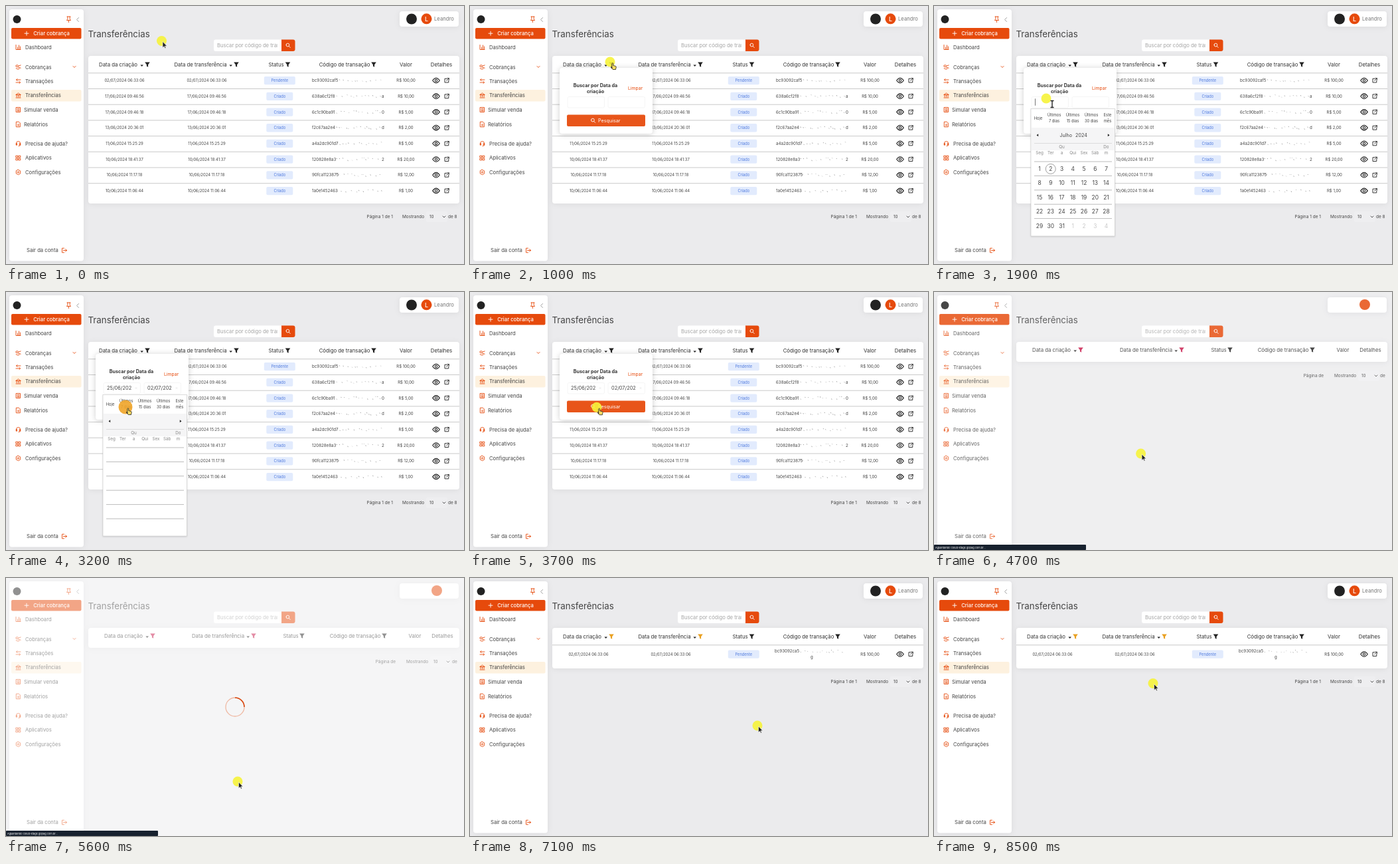
An HTML page that plays this animation: 690 by 388 pixels, repeating every 8700 ms.

```html
<!DOCTYPE html>
<html lang="pt-BR">
<head>
<meta charset="utf-8">
<title>Transferências</title>
<style>
  html, body { margin: 0; width: 100%; height: 100%; overflow: hidden; background: #ebebed; }
  svg { display: block; width: 100%; height: 100%; font-family: Inter, "Open Sans", sans-serif; }
  .card { filter: drop-shadow(0 1px 4px #0001); }
  .popup { filter: drop-shadow(0 1px 4px #0003); }
  .sheet { filter: drop-shadow(0 1px 1px #0002); }
</style>
</head>
<body>
<svg id="stage" viewBox="0 0 690 388"></svg>
<script>
const LOOP = 8700, STEP = 100;
const ORANGE = '#e64a0c', INK = '#444';

// Markup helpers: text is centred vertically on y.
const text = (x, y, s, { size = 7.7, fill = INK, weight = 400, anchor = 'start' } = {}) =>
  `<text x="${x}" y="${y + size * 0.36}" font-size="${size}" fill="${fill}" font-weight="${weight}" text-anchor="${anchor}">${s}</text>`;
const mid = (x, y, s, style) => text(x, y, s, { ...style, anchor: 'middle' });
const rect = (x, y, w, h, fill, r = 0, more = '') =>
  `<rect x="${x}" y="${y}" width="${w}" height="${h}" rx="${r}" fill="${fill}" ${more}/>`;
const circle = (x, y, r, fill, more = '') => `<circle cx="${x}" cy="${y}" r="${r}" fill="${fill}" ${more}/>`;
const line = (x1, x2, y, color, width = 0.8) => `<path d="M${x1} ${y}H${x2}" stroke="${color}" stroke-width="${width}"/>`;
const icon = (x, y, d, color = ORANGE, width = 0.9) =>
  `<path transform="translate(${x} ${y})" d="${d}" fill="none" stroke="${color}" stroke-width="${width}" stroke-linecap="round" stroke-linejoin="round"/>`;
const solid = (x, y, d, fill = '#222') => `<path transform="translate(${x} ${y})" d="${d}" fill="${fill}"/>`;
const group = (id, content) => `<g id="${id}">${content}</g>`;

const ICONS = {
  chart: 'M-3.5-3.5V3.5H3.5M-1 3V0M1 3V-3M3 3V-1',
  coins: 'M-3.5-1.8a1.6 1.6 0 1 0 3.2 0a1.6 1.6 0 1 0-3.2 0M.3-1.8L3.6-3M-.5 0L3.6 1.2M-3.4 1.8Q0 4.5 1.8 2.2',
  swap: 'M3.5-2H-3M-1.5-3.5L-3-2L-1.5-.5M-3.5 2H3M1.5 .5L3 2L1.5 3.5',
  bank: 'M-3.5-1.2L0-3.5L3.5-1.2ZM-2.5-1V2.2M0-1V2.2M2.5-1V2.2M-3.5 3.5H3.5',
  calculator: 'M-3-3.5H3V3.5H-3ZM-1.5-1.5H1.5M-1.5 .5H1.5M-1.5 2H1.5',
  report: 'M-2.8-3.8H1L2.8-2V3.8H-2.8ZM-1 0H1M-1 1.8H1',
  headset: 'M-3 1V-.5a3 3 0 0 1 6 0V1M-3.3 0V2.2H-2V0ZM3.3 0V2.2H2V0ZM3 2.2Q3 3.6 .5 3.6',
  apps: 'M-3.3-3.3H-.7V-.7H-3.3ZM.7-3.3H3.3V-.7H.7ZM-3.3 .7H-.7V3.3H-3.3ZM.7 .7H3.3V3.3H.7Z',
  gear: 'M0-3.7L3.2-1.9V1.9L0 3.7L-3.2 1.9V-1.9ZM-1.2 0a1.2 1.2 0 1 0 2.4 0a1.2 1.2 0 1 0-2.4 0',
  exit: 'M0-3.3H-3V3.3H0M-1 0H4M2.3-1.8L4 0L2.3 1.8',
  pin: 'M-2.5-4H2.5M-1.7-4V-.5L-3 1.5H3L1.7-.5V-4M0 1.5V4.5',
  left: 'M1.5-3L-1.5 0L1.5 3',
  down: 'M-2-1L0 1L2-1',
  lens: 'M-3-.7a2.4 2.4 0 1 0 4.8 0a2.4 2.4 0 1 0-4.8 0M1.1 1.1L3.2 3.2',
  eye: 'M-5.3 0Q0-7.6 5.3 0Q0 7.6-5.3 0ZM-1.7 0a1.7 1.7 0 1 0 3.4 0a1.7 1.7 0 1 0-3.4 0',
  open: 'M0-2.8H-3V3H2.8V0M.8-3.3H3.3V-.8M3.3-3.3L-.3 .3',
};
const FUNNEL = 'M-3.8-3.5H3.8L1.1 .3V3.8L-1.1 2.4V.3Z';
const CARET = 'M-2.3-1H2.3L0 1.5Z';

const MENU = [
  [62, 29, 'chart', 'Dashboard'], [92, 29, 'coins', 'Cobranças'], [113, 29, 'swap', 'Transações'],
  [134.5, 29, 'bank', 'Transferências'], [156, 27, 'calculator', 'Simular venda'], [178, 27, 'report', 'Relatórios'],
  [207, 29, 'headset', 'Precisa de ajuda?'], [228.5, 29, 'apps', 'Aplicativos'], [250, 29, 'gear', 'Configurações'],
];

const sidebar = () => rect(5, 5, 112, 378.5, '#fff', 4, 'class="card"')
  + circle(16.5, 20, 6, '#222')
  + icon(94.5, 20, ICONS.pin) + icon(108, 20.5, ICONS.left, '#999')
  + rect(8, 33, 105.5, 16.5, ORANGE, 2)
  + icon(31, 41.2, 'M-3 0H3M0-3V3', '#fff') + mid(68.5, 41.2, 'Criar cobrança', { fill: '#fff', weight: 500 })
  + rect(8, 126, 105.5, 17.5, '#fdf1df', 2)
  + MENU.map(([y, x, name, label]) => icon(18.5, y, ICONS[name]) + text(x, y, label)).join('')
  + icon(103, 91.5, ICONS.down)
  + text(31, 367.5, 'Sair da conta') + icon(87.5, 367.5, ICONS.exit);

const toolbar = () => text(123.5, 42.5, 'Transferências', { size: 13.3 })
  + rect(313, 50.5, 103, 17.5, '#fff', 3)
  + `<g clip-path="url(#searchClip)">${text(318, 59.2, 'Buscar por código de transação', { fill: '#a5a5a5' })}</g>`
  + `<path d="M415 50.5h17.5q3 0 3 3v11.5q0 3-3 3H415z" fill="${ORANGE}"/>` + icon(425, 59.3, ICONS.lens, '#fff')
  + rect(593, 8, 89, 23, '#fff', 4, 'class="card"');

const profile = () => circle(611, 19.5, 8, '#222') + circle(633.5, 19.3, 8, ORANGE)
  + mid(633.5, 19.5, 'L', { size: 9, fill: '#fff', weight: 500 }) + text(645, 19.5, 'Leandro', { fill: '#777' });

// Each column: label centre, then funnel centre when it can be filtered.
const WIDE = [[169, 213], [293, 347], [407, 424.5], [510, 554], [602.5], [656]];
const EMPTY = [[177, 221], [319.5, 373], [429, 446], [526, 570], [616], [657.5]];
const LABELS = ['Data da criação', 'Data de transferência', 'Status', 'Código de transação', 'Valor', 'Detalhes'];

const table = (columns, y, bottom) => rect(124, 75, 559, bottom - 75, '#fff', 4, 'class="card"')
  + columns.map(([x, funnel], i) => mid(x, y, LABELS[i], { size: 7.8, fill: '#333' })
    + (funnel ? solid(funnel, y, FUNNEL, i < 2 ? 'var(--filter)' : '#222') : '')
    + (i < 2 ? solid(funnel - 8.3, y + 1.6, CARET) : '')).join('');

const pager = (y, page, dx, total) => text(543.5 + dx * 2.2, y, page, { size: 6.5 })
  + rect(633 + dx, y - 8, 32, 16, '#eeeef0', 2)
  + text(597 + dx, y, 'Mostrando', { size: 6.5 }) + text(638 + dx, y, '10', { size: 6.3 })
  + icon(660 + dx, y, ICONS.down, INK) + text(666 + dx, y, total, { size: 6.5 });

let seed = 7;
const random = () => (seed = seed * 16807 % 2147483647) / 2147483647;
const specks = (y, from = 498, to = 566) => {
  let d = '';
  for (let x = from; x < to; x += 2.5 + random() * 6)
    d += `M${x.toFixed(1)} ${(y - 2.5 + random() * 4).toFixed(1)}l.5 ${(0.5 + random()).toFixed(1)}`;
  return `<path d="${d}" stroke="#777" stroke-width=".7"/>`;
};

const ROWS = [
  ['02/07/2024 06:33:06', 'bc93092caf5', '', '100,00'],
  ['17/06/2024 09:46:56', '638a6cf2f8', 'a', '10,00'],
  ['17/06/2024 09:46:18', '6c1c90ba91', '0', '5,00'],
  ['13/06/2024 20:36:01', 'f2c67aa2e4', 'd', '2,00'],
  ['11/06/2024 15:25:29', 'a4a2dc901d7', '', '5,00'],
  ['10/06/2024 18:41:37', '120828e8a3', '2', '20,00'],
  ['10/06/2024 11:17:18', '90fca1123875', '', '12,00'],
  ['10/06/2024 11:06:44', '1a0e1452463', '', '1,00'],
];
const row = ([date, , , value], y, pending) => {
  const width = pending ? 47 : 40;
  return mid(178.5, y, date, { size: 5.9 }) + mid(302.5, y, date, { size: 5.9 })
    + rect(412.3 - width / 2, y - 6, width, 12.3, '#e2ebfd', 2)
    + mid(412.3, y + 0.2, pending ? 'Pendente' : 'Criado', { size: 5.7, fill: '#4f7ade' })
    + mid(602.5, y, 'R$ ' + value, { size: 6 })
    + icon(648, y, ICONS.eye, '#222', 1.1) + icon(664, y, ICONS.open, '#222');
};
const fullRows = () => ROWS.map((r, i) => {
  const y = 112 + i * 23.7;
  return row(r, y, i === 0) + text(461, y, r[1], { size: 6.2 }) + specks(y) + text(566, y, r[2], { size: 6.2 })
    + line(124, 683, 100.8 + i * 23.7, '#bbb');
}).join('');
const resultRow = () => line(124, 683, 100.8, '#bbb') + row(ROWS[0], 114.5, true)
  + text(459, 110, 'bc93092ca5', { size: 6.2 }) + specks(110) + text(513, 118.5, 'g', { size: 6.2 });

const popup = () => rect(135, 93, 140, 99, '#fff', 4, 'class="popup"')
  + mid(189, 119.5, 'Buscar por Data da', { size: 7.2, weight: 700, fill: '#333' })
  + mid(189, 128, 'criação', { size: 7.2, weight: 700, fill: '#333' })
  + text(238, 124, 'Limpar', { size: 6.8, fill: ORANGE })
  + [147, 208].map(x => rect(x, 136.5, 55.5, 16.5, '#fff', 2, 'stroke="#f1f1f1" stroke-width=".7"')).join('')
  + group('dates', text(152, 144.6, '25/06/202', { size: 7.4 }) + text(213, 144.6, '02/07/202', { size: 7.4 })
    + [196, 257].map(x => icon(x, 144.5, 'M-1-1L1 1M1-1L-1 1', '#ddd', 0.6)).join(''))
  + group('inputCaret', rect(152, 139.3, 0.8, 10.5, '#555'))
  + rect(146, 163.5, 118, 17.5, '#e8551a', 2)
  + `<g id="searchLabel">${icon(185.5, 172.3, ICONS.lens, 'var(--label)')}${text(193, 172.3, 'Pesquisar', { size: 7.2, fill: 'var(--label)' })}</g>`;

const RANGES = [[157, 'Hoje'], [181, 'Últimos', '7 dias'], [209, 'Últimos', '15 dias'], [237, 'Últimos', '30 dias'], [261.5, 'Este', 'mês']];
const WEEKDAYS = [['Seg'], ['Ter'], ['Qu', 'a'], ['Qui'], ['Sex'], ['Sáb'], ['Do', 'm']];
const dayX = i => 159 + 16.75 * i;
const calendar = () => `<rect id="sheet" x="146" y="154.5" width="126.3" fill="#fff" stroke="#c8c8c8" stroke-width=".6" class="sheet"/>`
  + RANGES.map(([x, a, b]) => b
    ? mid(x, 164.3, a, { size: 5.8 }) + mid(x, 172.6, b, { size: 5.8 })
    : mid(x, 168.8, a, { size: 5.8 })).join('')
  + rect(147, 183, 125, 34, '#f5f5f6') + line(151, 268, 206.5, '#ccc', 0.6)
  + solid(156, 194.3, 'M1.2-2V2L-1.5 0Z') + solid(263, 194.3, 'M-1.2-2V2L1.5 0Z')
  + WEEKDAYS.map(([a, b], i) => b
    ? mid(dayX(i), 212, a, { size: 6.3, fill: '#888' }) + mid(dayX(i), 220.5, b, { size: 6.3, fill: '#888' })
    : mid(dayX(i), 220.5, a, { size: 6.3, fill: '#888' })).join('')
  + [0, 1, 2, 3, 4].map(r => line(151, 268, 234 + 21.4 * r, '#aaa')).join('')
  + group('lastWeek', line(151, 268, 341, '#aaa'))
  + group('month', text(189.5, 194.3, 'Julho', { size: 7.2 }) + text(213, 194.3, '2024', { size: 7.2 })
    + circle(dayX(1), 245, 7.5, 'none', 'stroke="#888" stroke-width=".8"')
    + Array.from({ length: 35 }, (_, i) => mid(dayX(i % 7), 245 + 21.4 * Math.floor(i / 7), i % 31 + 1,
      { size: 8.4, fill: i < 31 ? INK : '#c8c8c8' })).join(''));

const pointer = () => circle(0, 0, 7.5, '#f6f33a', 'id="spot" fill-opacity=".9"')
  + `<g stroke-linejoin="round">
    <path id="arrow" d="M1.5 1V10.2L3.7 8.2L5.1 11.2L6.5 10.5L5.1 7.7H8Z" fill="#222" stroke="#fff" stroke-width=".6"/>
    <path id="beam" d="M6.5 3.5H11.5M9 3.5V13.5M6.5 13.5H11.5" fill="none" stroke="#222" stroke-width="1.4"/>
    <path id="hand" d="M2.8 10V2.5q1-1.4 2 0V5.5l3.6 1q1 .4.8 1.5L8.5 11.5H4.2L1 8Q1.4 6.6 2.8 8Z" fill="#f7dc62" stroke="#222" stroke-width=".8"/></g>`;

const stage = document.getElementById('stage');
stage.innerHTML = '<clipPath id="searchClip"><path d="M314 50H409V69H314Z"/></clipPath>'
  + rect(0, 0, 690, 388, '#ebebed') + sidebar() + toolbar()
  + group('profile', profile()) + group('blankProfile', circle(649, 19, 8, ORANGE))
  + group('fullTable', table(WIDE, 88, 297) + fullRows() + pager(317, 'Página 1 de 1', 0, 'de 8'))
  + group('emptyTable', table(EMPTY, 87, 105) + pager(126, 'Página de', 6, 'de'))
  + group('resultTable', table(WIDE, 88, 136) + resultRow() + pager(156, 'Página 1 de 1', 0, 'de 8'))
  + group('popup', popup()) + group('calendar', calendar())
  + rect(0, 0, 690, 388, '#fff', 0, 'id="veil"')
  + group('spinner', circle(345, 194, 14, 'none', 'stroke="#efb9a3" stroke-width="1.3"')
    + '<path id="arc" d="M345 180a14 14 0 0 1 14 14" fill="none" stroke="#d84a14" stroke-width="1.6"/>')
  + group('statusBar', rect(0, 380, 229, 8, '#17212e', 1)
    + text(2, 384.4, 'Aguardando cloud-stage.gopag.com.br...', { size: 3.9, fill: '#fff' }))
  + group('pointer', pointer());

const $ = id => document.getElementById(id);
const show = (id, visible) => $(id).setAttribute('display', visible ? 'inline' : 'none');
const set = (id, name, value) => $(id).setAttribute(name, value);
const during = (t, from, to) => t >= from && t < to;
const ramp = (t, from, to) => Math.min(1, Math.max(0, (t - from) / (to - from)));

// Pointer stops: time, x, y.
const PATH = [
  [0, 234.5, 52.5], [400, 211, 84], [1000, 211, 84], [1400, 169, 139], [2100, 169, 139], [2400, 180, 173],
  [3600, 180, 173], [3900, 222, 174], [4500, 222, 174], [4600, 298.5, 221], [4900, 349, 306], [5900, 349, 306],
  [6000, 352, 226], [6400, 352, 226], [7100, 433, 222], [7300, 415, 164], [8000, 330, 158.5], [LOOP, 330, 158.5],
];
function pointerAt(t) {
  const i = PATH.findIndex(stop => stop[0] > t);
  const [t0, x0, y0] = PATH[i - 1], [t1, x1, y1] = PATH[i];
  const p = ramp(t, t0, t1), eased = p * p * (3 - 2 * p);
  return [x0 + (x1 - x0) * eased, y0 + (y1 - y0) * eased];
}

function render(t) {
  const loading = during(t, 4700, 6000), done = t >= 6000;
  show('fullTable', t < 4700);
  show('emptyTable', loading);
  show('resultTable', done);
  show('profile', !loading);
  show('blankProfile', loading);
  stage.style.setProperty('--filter', done ? '#e9a020' : t >= 4600 ? '#c8194b' : '#222');

  show('popup', during(t, 700, 4700));
  set('popup', 'opacity', ramp(t, 600, 900));
  show('dates', t >= 3100);
  show('inputCaret', during(t, 1600, 2200) || during(t, 2700, 3000));
  stage.style.setProperty('--label', t < 4300 ? '#fff' : '#8f300c');

  const cleared = t >= 3100, opening = ramp(t, 1300, 1700), scale = 0.8 + 0.2 * opening;
  show('calendar', during(t, 1400, 3500));
  set('calendar', 'opacity', opening * (1 - ramp(t, 3200, 3500)));
  set('calendar', 'transform', `translate(0 ${154 * (1 - scale)}) scale(1 ${scale})`);
  set('sheet', 'height', cleared ? 212.5 : 191.5);
  show('month', !cleared);
  show('lastWeek', cleared);

  set('veil', 'opacity', 0.5 * (done ? 0.5 * (1 - ramp(t, 6000, 6100)) : ramp(t, 4600, 4900)));
  show('spinner', during(t, 4800, 6000));
  set('arc', 'transform', `rotate(${360 * ramp(t, 5300, 5600)} 345 194)`);
  show('statusBar', during(t, 4400, 6000));

  const [x, y] = pointerAt(t);
  const pressed = [[600, 800], [1400, 1600], [2900, 3400], [4200, 4400]].some(([a, b]) => during(t, a, b));
  const beam = during(t, 1300, 2300), hand = !beam && during(t, 400, 4600);
  set('pointer', 'transform', `translate(${x} ${y})`);
  set('spot', 'r', pressed ? 10.5 : 7.5);
  set('spot', 'fill', pressed ? '#f0a428' : '#f6f33a');
  show('beam', beam);
  show('hand', hand);
  show('arrow', !beam && !hand);
}

function tick() {
  render(Math.floor(performance.now() % LOOP / STEP) * STEP);
  requestAnimationFrame(tick);
}
tick();
</script>
</body>
</html>
```
